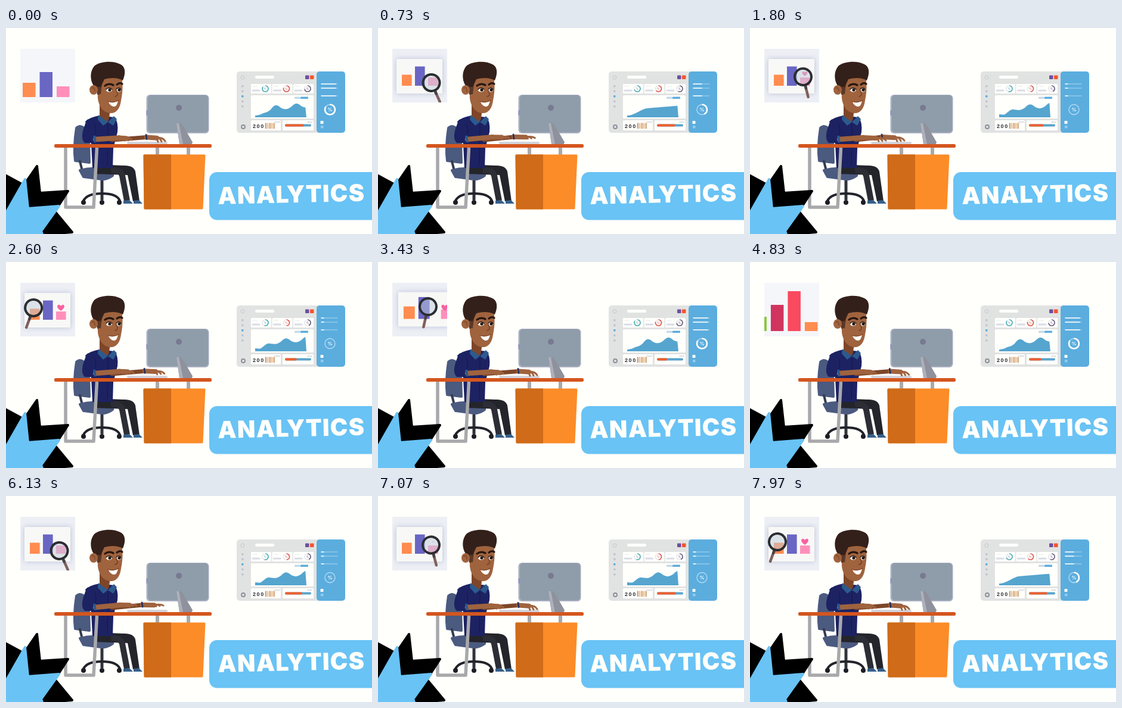
An HTML page with a canvas that plays this animation: 614x346 px, repeating every 8000 ms.

```html
<!DOCTYPE html>
<html lang="en">
<head>
<meta charset="utf-8">
<title>Analytics</title>
<style>
html, body { margin: 0; width: 100%; height: 100%; overflow: hidden; background: #fffffc; }
canvas { display: block; width: 614px; height: 346px; }
</style>
</head>
<body>
<canvas id="stage" width="614" height="346"></canvas>
<script>
const c = document.getElementById('stage').getContext('2d');
const LOOP = 8000, CARD_LOOP = 5400, BOARD_LOOP = 5000, TYPE_LOOP = 1140;
const TAU = Math.PI * 2;
const PAPER = '#fffffc', SKIN = '#9f633e', SHADE = '#7d4629', HAIR = '#34201a';
const NAVY = '#1d2262', DENIM = '#2d5a8e', SLATE = '#4b5a7f', BLUE = '#5badde', SKY = '#69c3f5';

const mix = (a, b, k) => a + (b - a) * k;
const mixAll = (a, b, k) => a.map((v, i) => mix(v, b[i], k));
// Eased rise from 0 to 1 while t goes from a to b.
function ramp(t, a, b) {
  const k = Math.max(0, Math.min(1, (t - a) / (b - a)));
  return k * k * (3 - 2 * k);
}
// Rises over a..b, falls over d..e.
const pulse = (t, a, b, d, e) => ramp(t, a, b) - ramp(t, d, e);

function rect(x, y, w, h, color, r = 0) {
  c.fillStyle = color;
  c.beginPath();
  c.roundRect(x, y, w, h, r);
  c.fill();
}

function dot(x, y, rx, color, ry = rx) {
  c.fillStyle = color;
  c.beginPath();
  c.ellipse(x, y, rx, ry, 0, 0, TAU);
  c.fill();
}

function shape(d, color) {
  c.fillStyle = color;
  c.fill(new Path2D(d));
}

function stroke(d, color, w, cap = 'round') {
  c.strokeStyle = color;
  c.lineWidth = w;
  c.lineCap = cap;
  c.lineJoin = 'round';
  c.stroke(new Path2D(d));
}

// Filled shape whose corners are rounded by an outline of width w.
function soft(d, color, w) {
  shape(d, color);
  stroke(d, color, w);
}

const line = (x, y, x2, y2, color, w, cap) => stroke(`M${x} ${y}L${x2} ${y2}`, color, w, cap);

function ring(x, y, r, part, color, w) {
  c.strokeStyle = color;
  c.lineWidth = w;
  c.lineCap = 'butt';
  c.beginPath();
  c.arc(x, y, r, -TAU / 4, (part - .25) * TAU);
  c.stroke();
}

function label(s, x, y, font, color, align = 'center', spacing = 0) {
  c.font = font;
  c.fillStyle = color;
  c.textAlign = align;
  c.letterSpacing = spacing + 'px';
  c.fillText(s, x, y);
}

// ---- chart card ----
const BARS = [['#8cc63f', 24], ['#d0355f', 44], ['#fa4a5f', 67],
              ['#ff8c50', 24], ['#6a66c4', 42], ['#ff8fba', 18]];

function heart(x, y, s) {
  c.save();
  c.translate(x, y);
  c.scale(s, s);
  shape('M0 5C-11-2-4-9 0-3C4-9 11-2 0 5Z', '#f763a0');
  c.restore();
}

// Lens centre and lean of the handle.
const LENS_PATH = [[250, 130, 130, .4], [700, 89.5, 92, .42], [1800, 89, 82, .25],
                   [2570, 46, 77, -.35], [3430, 84, 75, -.22], [3850, 104, 74, -.1]];

function lens(u) {
  let i = 0;
  while (i < LENS_PATH.length - 2 && u >= LENS_PATH[i + 1][0]) i++;
  const a = LENS_PATH[i], b = LENS_PATH[i + 1];
  const [, x, y, lean] = mixAll(a, b, ramp(u, a[0], b[0]));
  c.save();
  c.globalAlpha = pulse(u, 250, 500, 3550, 3850);
  c.translate(x, y);
  c.rotate(-lean);
  line(0, 14, 0, 35, '#80605c', 4.5);
  line(0, 14, 0, 20, '#4a4145', 4.5);
  dot(0, 0, 14, 'rgba(190,205,220,.5)');
  ring(0, 0, 14, 1, '#2b2d30', 4);
  c.restore();
}

function chartCard(t) {
  const u = t % CARD_LOOP, scroll = u > 3880;
  const out = scroll ? 0 : ramp(u, 80, 520), into = scroll ? 0 : ramp(u, 3200, 3850);
  const page = pulse(u, 80, 520, 3550, 3850);
  const gap = mix(28.5, 22, out) + 10 * into;
  const x0 = mix(28, 40, out) + 10 * into + (scroll ? (CARD_LOOP - u) * .1123 : 0);
  const base = mix(116, 97, out) - 5 * into;

  c.save();
  c.beginPath();
  c.rect(24, 35, 92, 90);
  c.clip();
  rect(24, 35, 92, 90, '#f5f6fa');
  c.globalAlpha = page;
  rect(24, 35, 92, 90, '#edeff5');
  c.shadowColor = 'rgba(110,125,170,.4)';
  c.shadowBlur = 9;
  rect(x0 - 9, base - 45, gap * 3.5, 58, '#f8f8f6', 2);
  c.shadowBlur = 0;

  if (scroll || u < 500) c.globalAlpha = 1;
  BARS.forEach(([color, tall], i) => {
    if (!scroll && i < 3) return;
    const x = x0 + (i - 3) * gap + (i === 5 ? 45 * into : 0);
    const grow = scroll ? Math.max(0, Math.min(1, (117 - x) / 40)) : 1;
    const h = tall * grow * gap / 28.5;
    rect(x, base - h, gap * .755, h, color);
  });
  if (u < 3850) {
    heart(92 + 70 * into, 77, ramp(u, 1600, 1900));
    lens(u);
  }
  c.restore();
}

// ---- dashboard ----
function area(swing) {
  c.fillStyle = '#55a5cf';
  c.beginPath();
  c.moveTo(418, 150);
  for (let p = 0; p <= 1; p += .02) {
    const hump = swing * Math.cos((p - .4) / .4 * TAU);
    const h = 3 + ramp(p, 0, .4) * (9.5 + 7 * p + 5 * hump) + 2 * Math.max(0, -hump);
    c.lineTo(418 + 86 * p, 150 - h);
  }
  c.lineTo(504, 150);
  c.fill();
}

function dashboard(t) {
  const dip = pulse(t % BOARD_LOOP, 330, 1130, 2570, 3370);
  const knob = 492.5 + 7.5 * Math.cos(t / 7240 * TAU);
  const fill = 1 - dip;

  rect(387, 73, 150, 103, '#e1e3e2', 5);
  rect(521, 73, 48, 103, BLUE, 5);
  rect(418, 80, 32, 5, PAPER, 2.5);
  rect(502, 79.5, 6.5, 6.5, '#6c4fa0', 1);
  rect(510, 79.5, 6.5, 6.5, '#f0562f', 1);
  ring(397, 83, 3, 1, '#c3c6cf', 1);
  for (let i = 0; i < 5; i++) rect(395, 96 + i * 8.5, 3.5, 3.5, i === 2 ? BLUE : '#c0c4d0', 1);
  ring(398, 166, 3, 1, '#8c8d99', 1.8);

  ['#4fb0b5', '#e4574d', '#6f6080'].forEach((color, i) => {
    const x = 411 + i * 35.5;
    rect(x, 94, 34, 16, PAPER, 1.5);
    line(x + 3, 105, x + 14, 105, '#dadce6', 3);
    line(x + 3, 98, x + 10, 98, '#e6e7ee', 1);
    ring(x + 24, 102, 5, 1, '#e6e6ee', 1.7);
    ring(x + 24, 102, 5, .85 - .3 * dip - i * .06, color, 1.7);
    label('%', x + 24, 104, '5px Inter, sans-serif', color);
  });

  rect(411, 113, 105, 39, PAPER, 1.5);
  rect(484, 115.5, 10, 3.5, '#c5daea', 1);
  rect(494, 115.5, 13, 3.5, BLUE, 1);
  area(1 - 2 * dip);

  rect(411, 155, 50, 17, PAPER, 1.5);
  rect(464, 155, 52, 17, PAPER, 1.5);
  label('200', 414, 167.5, 'bold 9px "Liberation Sans", Arial, sans-serif', '#33333a', 'left', 1.6);
  for (let i = 0; i < 5; i++) line(436 + i * 3.4, 160, 436 + i * 3.4, 168.5, i % 2 ? '#e8a45d' : '#b98555', 1.7);
  line(451, 158, 459, 158, '#dcdee8', 2);
  line(506, 158, 513, 158, '#dcdee8', 2);
  line(470, 163.5, 510, 163.5, '#5aa5cc', 4);
  line(470, 163.5, knob - 2, 163.5, '#ee6030', 4);

  [94, 101, 114].forEach(y => {
    line(529, y, 556, y, 'rgba(255,255,255,.5)', 1);
    line(529, y, 533 + 20 * fill, y, PAPER, 1.4);
  });
  ring(543.5, 137, 8.5, 1, 'rgba(255,255,255,.55)', 1.4);
  ring(543.5, 137, 8.5, fill * .85, PAPER, 2.6);
  label('%', 543.5, 140, 'bold 8px Inter, sans-serif', PAPER);
  rect(527.5, 156, 5, 5, PAPER, 1);
  rect(528, 164, 4.5, 4.5, '#94cbee', 1);
}

// ---- workplace ----
function chair() {
  soft('M118 168Q124 162 131 168L139 190L140 226L116 223Q113 200 118 168Z', SLATE, 4);
  stroke('M124 224L128 240L145 246', '#353c50', 4);
  soft('M124 239Q150 232 179 240L179 248Q170 255 160 254L130 250Z', SLATE, 4);
  line(161, 256, 161, 289, '#31333a', 5, 'butt');
  stroke('M130 290Q136 278 161 278Q186 278 191 290', '#22232a', 4);
  [130, 161, 190].forEach(x => dot(x, 293, 4, '#1d1e24'));
}

function desk() {
  const grey = '#a9a9ab', box = 'M232 214L333 214L329 303L233 303Z';
  stroke('M100 201L100 301L147 301L152.5 201', grey, 5.5, 'butt');
  rect(251, 200, 6, 14, grey);
  rect(303, 200, 6, 14, grey);
  soft(box, '#fb8c28', 3);
  c.save();
  c.beginPath();
  c.rect(225, 210, 52, 100);
  c.clip();
  soft(box, '#cf6b19', 3);
  c.restore();
  rect(81, 195, 264, 6, '#d4561e', 2.5);
}

function monitor() {
  rect(235.5, 112, 105, 65, '#a9b0c0', 6);
  rect(238, 113, 101, 62, '#8f9caa', 5);
  rect(235.5, 138, 2, 9, '#8d85c0', 1);
  dot(290, 134, 5, '#777a90');
  soft('M287 161L294 161L312 192L311 194L292 194Z', '#8f929c', 2);
  shape('M286 160L290 160L297 195L291 195Z', '#adb0bb');
}

function head() {
  shape('M157 125L175 135L173 152Q171 160 165 158L157 151Z', SHADE);
  shape('M153 82L194 82C197 98 195 112 193 122C191 136 185 143 176 143C165 143 156 134 154 118Z', SKIN);
  shape('M151 92L162 86L159 111L153 112Z', '#5a3826');
  shape('M147 97C140 86 141 71 149 63C158 56 180 54 192 61C202 66 200 79 196 88'
      + 'C187 83 176 83 165 86L159 99L152 99Z', HAIR);
  dot(147, 104, 7, SKIN, 8);
  stroke('M144 101Q149 98 149 106', SHADE, 1.5);
  stroke('M166 97Q173 92 180 96M186 95Q191 91 195 94', '#241611', 3.2);
  [[173, 5], [189, 4]].forEach(([x, r]) => {
    dot(x, 104, r, '#fffdf6', 3.6);
    dot(x + 1, 104, 2.6, '#24150f');
    stroke(`M${x - r} 103Q${x} 98 ${x + r} 103`, '#241611', 1.4);
  });
  stroke('M185 105Q190 114 183 115', SHADE, 1.8);
  shape('M172 124Q180 127 188 122Q186 133 180 132Q174 130 172 124Z', PAPER);
  stroke('M171 123Q180 127 189 121.5', SHADE, 1.2);
}

function body() {
  shape('M146 229L196 231Q214 230 217 241L224 291L213 291L204 247L150 245Z', '#24242b');
  stroke('M176 239Q193 238 195 248L203 290', '#2d2d35', 10, 'butt');
  ['M197 290L207 289L213 295L197 295Z', 'M214 290L223 289L229 295L214 295Z']
    .forEach(d => shape(d, '#36608a'));
  shape('M133 157Q140 150 157 147L182 150Q189 158 187 175L180 202L179 235L145 235L143 195Z', NAVY);
  head();
  shape('M155 146L171 158L163 164L154 154Z', DENIM);
  shape('M171 158L181 148L186 153L180 164Z', DENIM);
  line(171, 161, 170, 230, '#14184b', 1);
}

// Wrist and fingertip of the near hand, then of the far hand.
const REST = [190, 184.5, 211, 188, 236, 183.5, 267, 190];
const LIFT = [192, 183, 219, 184, 229, 183, 264, 184];
const PRESS = [190, 184, 228, 189, 222, 183, 259, 189];

function hand(wx, wy, tx, ty) {
  const mx = mix(wx, tx, .55), my = mix(wy, ty, .2);
  line(wx, wy, mx, my, SKIN, 8);
  for (let i = 0; i < 3; i++) {
    stroke(`M${mx} ${my}Q${tx - 5 - i * 5} ${my - 2} ${tx - i * 6} ${ty + i * .6}`, SKIN, 3);
  }
}

function arms(t) {
  const p = t % TYPE_LOOP / TYPE_LOOP;
  const away = pulse(p, .2, .38, .72, .97), press = pulse(p, .44, .56, .58, .66);
  const [ax, ay, atx, aty, bx, by, btx, bty] = mixAll(mixAll(REST, LIFT, away), PRESS, press);
  rect(203, 191, 68, 4, '#d3d4dc', 2);
  line(178, 188, bx, by, SHADE, 7);
  hand(bx, by, btx, bty);
  line(bx - 1, by - 4, bx, by + 3, '#26325e', 2.8);
  shape('M136 154Q150 152 153 176L161 180L160 193L132 193Q122 184 136 154Z', NAVY);
  line(150, 187, ax, ay, SKIN, 8.5);
  hand(ax, ay, atx, aty);
  line(148, 181, 150, 192, DENIM, 4, 'butt');
  stroke('M149 162Q152 170 150 179', '#14184b', 1);
}

// ---- lower corners ----
function star() {
  soft('M-9 243L30 264L52 232L57 277L104 274L82 308L111 343L50 348L-9 348Z', '#000', 4);
  soft('M32 254L37 303L89 299L59 341L66 360L-9 360L-9 326Z', SKY, 4);
}

function banner() {
  rect(341, 242, 300, 80.5, SKY, 13);
  c.save();
  c.translate(355.5, 296);
  c.rotate(-.022);
  label('ANALYTICS', 0, 0, '900 39.5px Inter, "Open Sans", sans-serif', PAPER, 'left', 1.3);
  c.restore();
}

function draw(t) {
  rect(0, 0, 614, 346, PAPER);
  chartCard(t);
  dashboard(t);
  chair();
  body();
  monitor();
  desk();
  arms(t);
  star();
  banner();
}

const start = performance.now();
function tick() {
  draw((performance.now() - start) % LOOP);
  requestAnimationFrame(tick);
}
tick();
</script>
</body>
</html>
```
